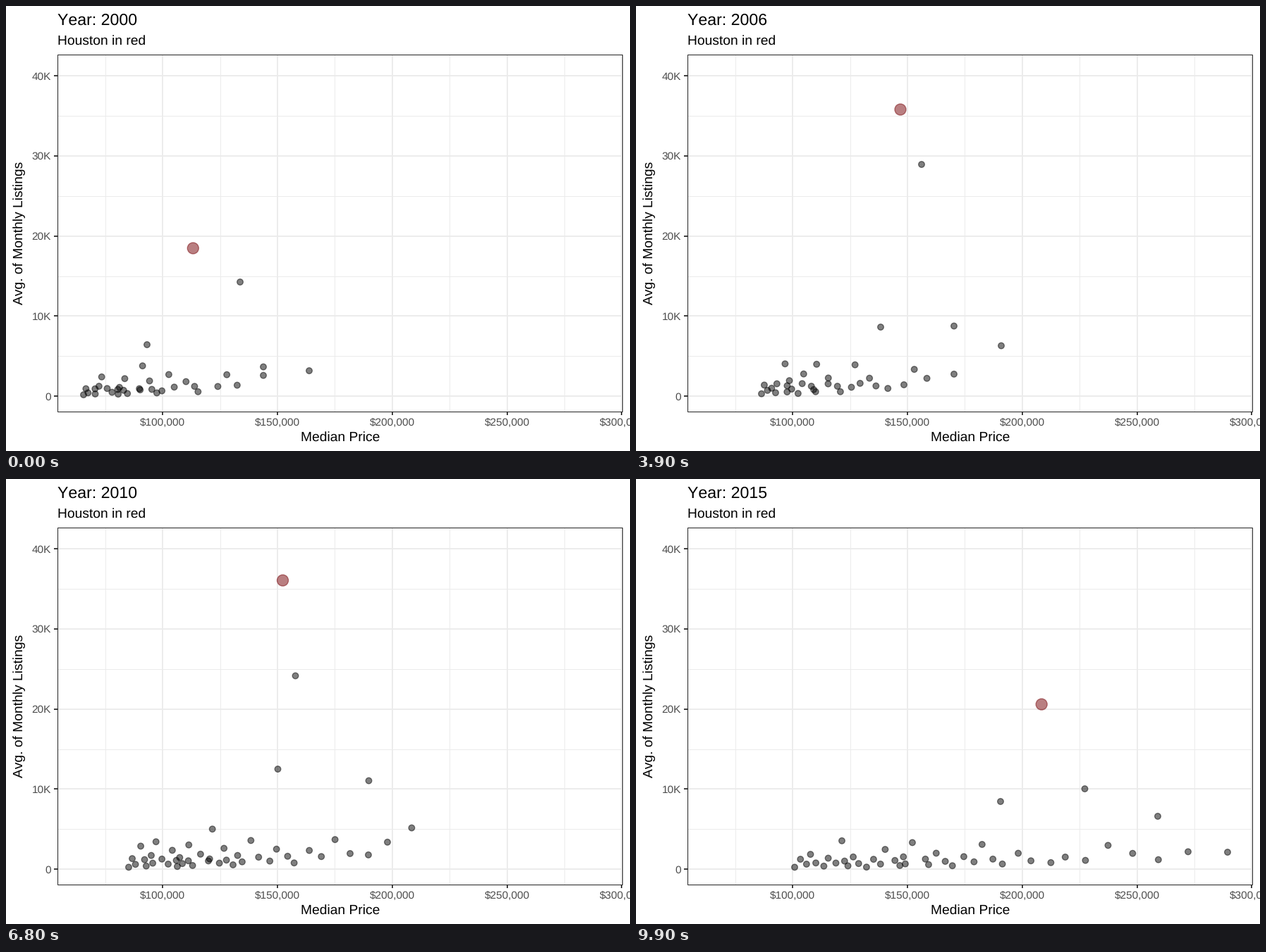
Recreate the animation shown at these times as a matplotlib script. Size 885 by 632 pixels, loop 10 s.

```python
import numpy as np
import matplotlib as mpl
import matplotlib.pyplot as plt
from matplotlib.animation import FuncAnimation
from matplotlib.patches import Rectangle

mpl.rcParams["font.family"] = "Liberation Sans"
mpl.rcParams["text.hinting"] = "none"
mpl.rcParams["text.kerning_factor"] = 6   # no pair kerning

W, H, DPI = 885, 632, 100
STEPS = 100
PX = 72 / DPI
LEFT, TOP, RIGHT, BOTTOM = 73, 69.2, 874.4, 576
ZERO = 554.3
GRID, DARK, TEXT = "#ebebeb", "#333333", "#4d4d4d"

# Large markets: a few turning points as (step, x, y)
HOUSTON = [(0, 265.3, 344), (17, 323.5, 242), (39, 375, 147), (46, 384, 94),
           (56, 387, 153), (68, 392.5, 144), (77, 414, 198),
           (86, 478.3, 319.5), (99, 575.2, 320)]
LEADERS = [
    [(0, 332, 392), (17, 374, 282), (39, 405, 225), (56, 399, 254),
     (68, 410.5, 279.5), (86, 510.5, 411), (99, 636.5, 440)],
    [(0, 200, 481), (17, 255, 467.5), (39, 347, 456), (56, 376.5, 409),
     (68, 385.5, 412), (86, 444.5, 450), (99, 517, 458)],
    [(0, 365, 512.5), (17, 398.5, 443.5), (39, 451, 454.5), (56, 503, 426.5),
     (68, 514.5, 428.5), (86, 614.5, 484.5), (99, 740, 479)],
    [(0, 430, 518), (11, 466, 500), (39, 518, 482.5), (53, 551, 488),
     (77, 590, 500), (86, 675.5, 526.5), (99, 839, 530)],
]

# Small markets: a crowd spread between the cheapest and dearest town
KEYS = (0, 17, 39, 56, 68, 86, 99)
CHEAP = (110, 126, 178, 178, 174, 179, 225)
DEAR = (365, 394, 451, 498, 541, 650, 783)
N = 41
rng = np.random.default_rng(7)
rank = np.linspace(0, 1, N)
spread = .57 * rank + .43 * rank ** 6
volume = np.arange(N) * .618 % 1
height = 3 + 18 * volume + 32 * volume ** 8 + 14 * rank ** 5
phase = rng.random(N)
opens = np.where(np.arange(N) % 4 == 3, rng.uniform(35, 60, N), 0)


def along(path, i):
    step, x, y = zip(*path)
    return np.interp(i, step, x), np.interp(i, step, y)


def crowd(i):
    t = i / (STEPS - 1)
    low, high = np.interp(i, KEYS, CHEAP), np.interp(i, KEYS, DEAR)
    wave = np.sin(2 * np.pi * (1.5 * t + phase))
    x = low + (high - low) * spread + 6 * wave * np.sin(np.pi * rank)
    y = ZERO - height * (.8 + .3 * np.sin(.9 * np.pi * t) + .12 * wave)
    return np.column_stack([x, y])[opens <= i]


fig = plt.figure(figsize=(W / DPI, H / DPI), dpi=DPI, facecolor="white")
ax = fig.add_axes([0, 0, 1, 1])
ax.set_xlim(0, W)
ax.set_ylim(H, 0)
ax.axis("off")


def line(xs, ys, color, width, z):
    ax.plot(xs, ys, color=color, lw=width * PX, solid_capstyle="butt", zorder=z)


def label(x, y, s, size, color="black", **kw):
    return ax.text(x, y, s, fontsize=size * PX, color=color,
                   va="baseline", rotation_mode="anchor", **kw)


def dots(radius, color, z):
    art = ax.scatter([], [], color=[color], linewidths=1.3 * PX,
                     alpha=.5, zorder=z)
    # Two equal sizes keep the dots off the whole-pixel marker path
    art.set_sizes([(2 * radius * PX) ** 2] * 2, DPI)
    return art


for k in range(75, 301, 25):
    x = 222.3 + (k - 100) * 3.2555
    major = k % 50 == 0
    line([x, x], [TOP, BOTTOM], GRID, 1.87 if major else .95, 2 if major else 1)
    if major:
        line([x, x], [BOTTOM, BOTTOM + 4.8], DARK, 1.87, 3)
        label(x, 596.5, f"${k},000", 15.4, TEXT, ha="center")

for k in range(0, 41, 5):
    y = ZERO - k * 11.383
    major = k % 10 == 0
    line([LEFT, RIGHT], [y, y], GRID, 1.87 if major else .95, 2 if major else 1)
    if major:
        line([LEFT - 4.8, LEFT], [y, y], DARK, 1.87, 3)
        label(64, y + 5.5, f"{k}K" if k else "0", 15.4, TEXT, ha="right")

ax.add_patch(Rectangle((LEFT, TOP), RIGHT - LEFT, BOTTOM - TOP, fill=False,
                       ec=DARK, lw=1.1 * PX, zorder=6))
label(474, 617.7, "Median Price", 19.25, ha="center")
label(24, 322.6, "Avg. of Monthly Listings", 19.25, ha="center", rotation=90)
label(72.6, 55.2, "Houston in red", 19.25, ha="left")
title = label(72.6, 26.5, "", 23.1, ha="left")

others = dots(4.3, "black", 4)
red = dots(8, (.46, 0, .02), 5)


def draw(i):
    year = int(2000 + 15 * i / (STEPS - 1) + .5)
    title.set_text(f"Year: {year}")
    others.set_offsets(np.vstack([[along(p, i) for p in LEADERS], crowd(i)]))
    red.set_offsets([along(HOUSTON, i)])
    return title, others, red


anim = FuncAnimation(fig, draw, frames=STEPS, interval=100, repeat=True,
                     repeat_delay=0, blit=False)
plt.show()
```
